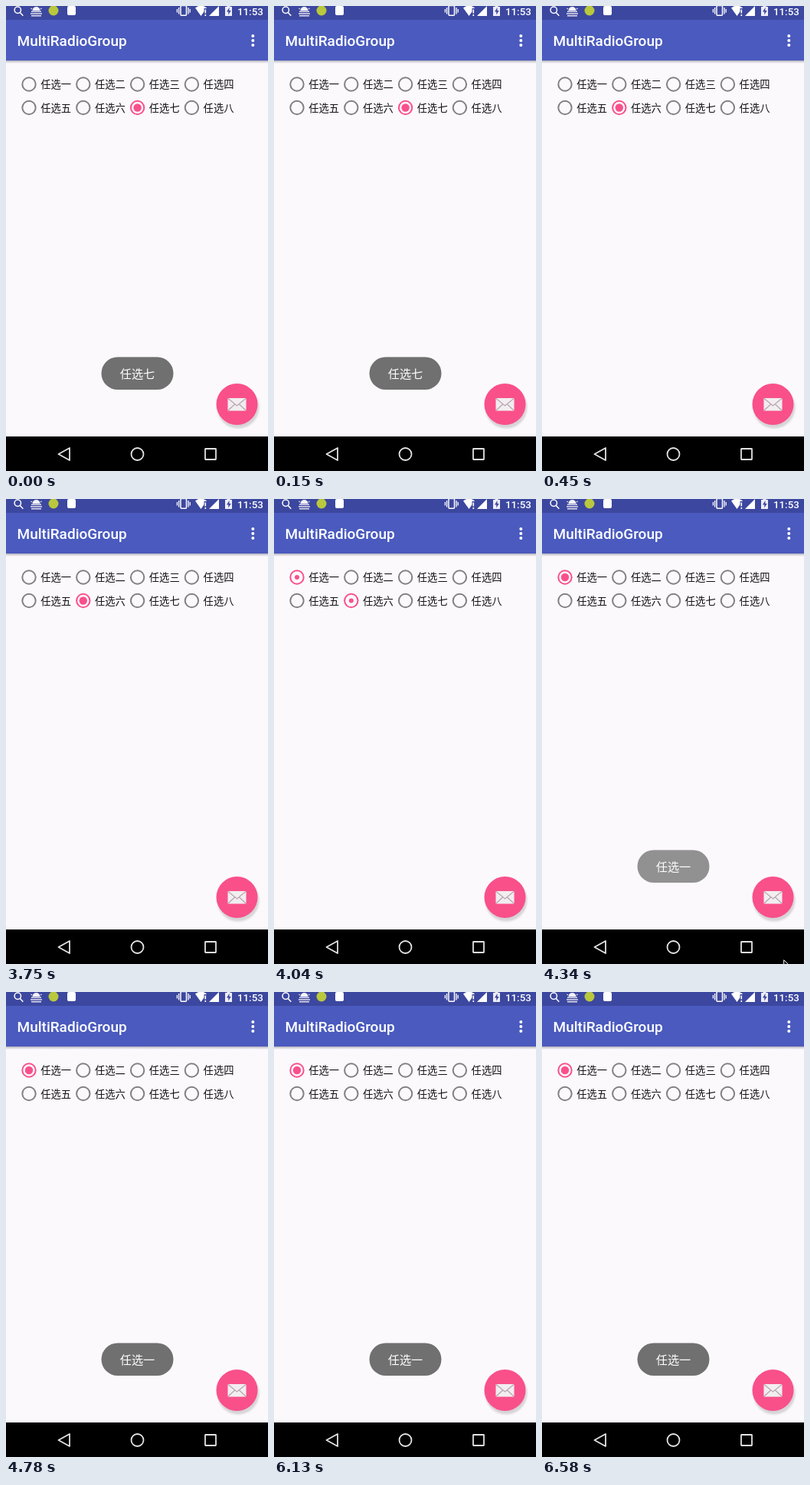
An HTML page for the animation above (8000 ms loop, 342 by 606 pixels).

```html
<!DOCTYPE html>
<html lang="zh-CN">
<head>
<meta charset="utf-8">
<title>MultiRadioGroup</title>
<style>
  html, body { margin: 0; width: 100%; height: 100%; overflow: hidden; background: #fcf9fd; }
  svg { display: block; width: 342px; height: 606px; }
  text { font-family: "Noto Sans CJK SC", "Noto Sans CJK", sans-serif; }
  .latin { font-family: Roboto, sans-serif; font-weight: 500; fill: #fff; }
  .label { font-size: 13.3px; fill: #111; }
  .toast { font-size: 15.2px; fill: #fff; text-anchor: middle; }
  .radio { color: #828082; }
  .ring { fill: none; stroke: currentColor; stroke-width: 2; }
  .dot { fill: currentColor; r: 0; }

  .radio, .dot, .ring, .fade, #cursor { animation: 8s step-end infinite; }
  #radio1 { animation-name: pick1; }
  #radio1 .dot { animation-name: grow1; }
  #radio6 { animation-name: pick6; }
  #radio6 .dot { animation-name: grow6; }
  #radio6 .ring { animation-name: settle6; }
  #radio7 { animation-name: pick7; }
  #radio7 .dot { animation-name: grow7; }
  #toast7 { animation-name: toast7; }
  #toast1 { animation-name: toast1; }
  #cursor { animation-name: point; }

  @keyframes pick1 { 0% { color: #828082 } 50.5%, 100% { color: #f9508a } }
  @keyframes grow1 { 0% { r: 0 } 50.5% { r: 3px } 52.375%, 100% { r: 5.2px } }
  @keyframes pick6 { 0% { color: #828082 } 5.625% { color: #f9508a } 52.375%, 100% { color: #828082 } }
  @keyframes grow6 { 0% { r: 0 } 5.625% { r: 5.2px } 50.5% { r: 3px } 52.375%, 100% { r: 0 } }
  @keyframes settle6 { 0% { stroke-width: 2 } 52.375% { stroke-width: 2.7 } 54.25%, 100% { stroke-width: 2 } }
  @keyframes pick7 { 0% { color: #f9508a } 5.625%, 100% { color: #828082 } }
  @keyframes grow7 { 0% { r: 5.2px } 5.625%, 100% { r: 0 } }
  @keyframes toast7 { 0% { opacity: 1 } 5.625%, 100% { opacity: 0 } }
  @keyframes toast1 {
    0% { opacity: 0 } 52.375% { opacity: .45 } 54.25% { opacity: .76 }
    56.125% { opacity: .93 } 58%, 100% { opacity: 1 }
  }
  @keyframes point {
    0% { opacity: 0; transform: translate(178px, 578px) }
    52.375% { opacity: 1; transform: translate(178px, 578px) }
    54.25% { opacity: 1; transform: translate(315px, 600px) }
    59.75%, 100% { opacity: 0; transform: translate(315px, 600px) }
  }
</style>
</head>
<body>
<svg viewBox="0 0 342 606">
  <defs>
    <linearGradient id="edge" x2="0" y2="1">
      <stop stop-color="#8f8d9c" stop-opacity=".7"/>
      <stop offset="1" stop-color="#aaa" stop-opacity="0"/>
    </linearGradient>
    <filter id="blur" x="-20%" y="-20%" width="140%" height="140%">
      <feGaussianBlur stdDeviation="1.2"/>
    </filter>
  </defs>

  <rect width="342" height="606" fill="#fcf9fd"/>
  <rect y="71" width="342" height="4" fill="url(#edge)"/>
  <rect y="17" width="342" height="54" fill="#4a5abe"/>
  <rect width="342" height="18" fill="#3c479f"/>

  <!-- status bar -->
  <g fill="none" stroke="#fff" stroke-width="1.5">
    <circle cx="15.3" cy="5.2" r="4.2"/>
    <path d="M18.3 8.5l4 4.3"/>
    <rect x="228" y="-.5" width="7.5" height="12.8" rx="1"/>
    <path d="M225.6 2v8.5M238 2v8.5M223.4 4v4.5M240.2 4v4.5" stroke-width="1.3"/>
  </g>
  <path d="M34.5 6a5 5 0 0 1 10 0z" fill="#f5f3f8"/>
  <path d="M33 7.3h13M32 10h15M33 12.7h13M32.5 3l1.5 1M46.5 3l-1.5 1" stroke="#e4e2ef" stroke-width="1.5"/>
  <circle cx="62" cy="6" r="6.5" fill="#b9c83c"/>
  <rect x="80" y="0" width="11" height="12" rx="2" fill="#fff"/>
  <path d="M247 2.5Q254.5 -3.5 262 2.5L254.5 13z" fill="#fff"/>
  <path d="M258.5 3h5v11h-5z" fill="#3c479f"/>
  <path d="M260.3 4.5v5M260.3 11v2" stroke="#fff" stroke-width="1.6"/>
  <path d="M265 13L278 0v13z" fill="#fff"/>
  <path d="M286 1h2.5v-2h4v2h2.5v12h-9z" fill="#eeedf6"/>
  <path d="M291.5 2l-3.5 5.5h2.3v4l3.4-5.5h-2.2z" fill="#3c479f"/>
  <text class="latin" x="302" y="12" font-size="13.3">11:53</text>

  <!-- app bar -->
  <text class="latin" x="14.5" y="52" font-size="19">MultiRadioGroup</text>
  <g fill="#fff">
    <circle cx="322.3" cy="39" r="2"/>
    <circle cx="322.3" cy="45" r="2"/>
    <circle cx="322.3" cy="51" r="2"/>
  </g>

  <g id="radios"></g>
  <g id="toasts"></g>

  <!-- mail button -->
  <circle cx="303" cy="523" r="27.5" fill="#777" opacity=".28" filter="url(#blur)"/>
  <circle cx="301.5" cy="519" r="27" fill="#f9508a"/>
  <rect x="289.5" y="511" width="24" height="16.5" rx="1" fill="#f1eef0"/>
  <path d="M290 527l8.500-8M313 527l-8.500-8M290 511.500l11.500 9.500l11.500-9.500" fill="none" stroke="#b9a5ae" stroke-width="1.2"/>

  <!-- navigation bar -->
  <rect y="561" width="342" height="45"/>
  <g fill="none" stroke="#e2e2e2" stroke-width="1.8">
    <path d="M68.500 584L83 576v16z" stroke-linejoin="round"/>
    <circle cx="171.500" cy="584" r="8"/>
    <rect x="260" y="577" width="14" height="14" rx=".5"/>
  </g>

  <path id="cursor" d="M.7 .8v13.500l3.200-3l2.300 5l2.300-1l-2.200-4.900h4.300z" fill="#000" stroke="#fff"/>
</svg>
<script>
  const digits = [...'一二三四五六七八'];
  const name = n => '任选' + digits[n - 1];

  const radio = (_, i) => {
    const x = 30 + (i % 4) * 70.8, y = i < 4 ? 102 : 132.5;
    return `<g class="radio" id="radio${i + 1}">
      <circle class="ring" cx="${x}" cy="${y}" r="8.7"/>
      <circle class="dot" cx="${x}" cy="${y}"/>
      <text class="label" x="${x + 15.2}" y="${y + 5}">${name(i + 1)}</text>
    </g>`;
  };

  const toast = n => `<g class="fade" id="toast${n}">
    <rect x="124.500" y="457.500" width="94" height="42.500" rx="21.200" fill="#707070"/>
    <text class="toast" x="171.500" y="484.500">${name(n)}</text>
  </g>`;

  document.getElementById('radios').innerHTML = digits.map(radio).join('');
  document.getElementById('toasts').innerHTML = [7, 1].map(toast).join('');
</script>
</body>
</html>
```
